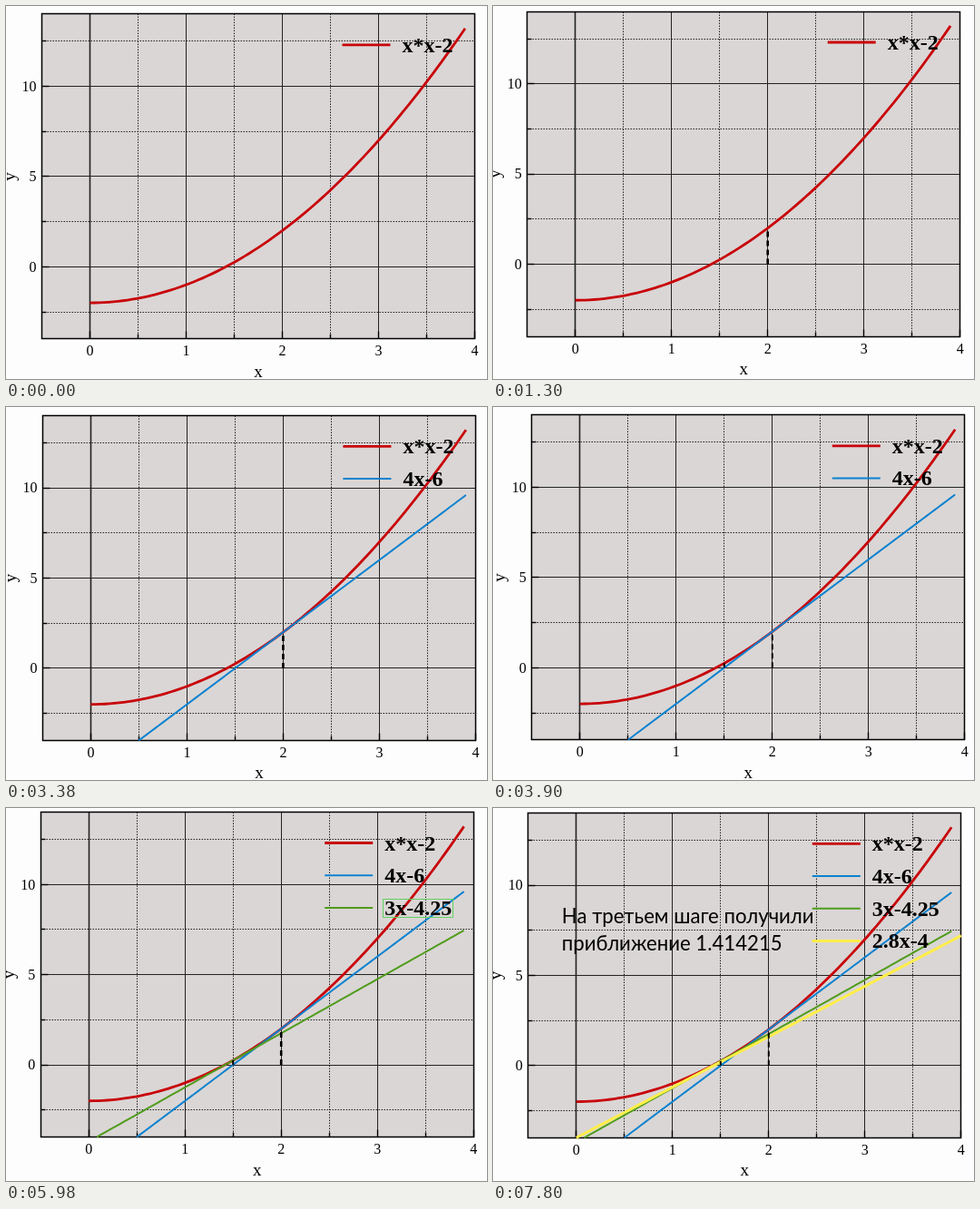
Write an HTML page with a canvas that moves like this. It is 530 px wide and 411 px high and loops after 9.1 s.

```html
<!DOCTYPE html>
<html lang="ru">
<head>
<meta charset="utf-8">
<style>
html, body { margin: 0; width: 100%; height: 100%; overflow: hidden; background: #fdfdfd; }
canvas { display: block; }
</style>
</head>
<body>
<canvas id="stage" width="530" height="411"></canvas>
<script>
const ctx = document.getElementById('stage').getContext('2d');
const STEP = 1300, UNIT_X = 106, UNIT_Y = 19.88;
const SERIF = '"Liberation Serif", "Times New Roman", serif';

const plots = [
  { label: 'x*x-2', color: '#c8040a', width: 2.8, from: 0, to: 3.9, fn: x => x * x - 2 },
  { label: '4x-6', color: '#0c82d0', width: 2, from: 0.5, to: 3.9, fn: x => 4 * x - 6 },
  { label: '3x-4.25', color: '#509c1c', width: 2, from: 0.0833, to: 3.9, fn: x => 3 * x - 4.25 },
  { label: '2.8x-4', color: '#ffee48', width: 3, from: 0, to: 4, fn: x => 2.8 * x - 4 }
];

// The chart shifts a little from step to step; legend is its left edge from x = 0.
const steps = [
  { x: 92.5, y: 287.3, lines: 1, legend: 278 },
  { x: 90.7, y: 284.5, lines: 1, legend: 278, drop: 2.6 },
  { x: 93.4, y: 287.9, lines: 2, legend: 278, drop: 2.6 },
  { x: 95.8, y: 287.3, lines: 2, legend: 278, drop: 2, second: true },
  { x: 91.2, y: 283, lines: 3, legend: 260, drop: 2.6, second: true, box: true },
  { x: 91.8, y: 283.8, lines: 4, legend: 260, drop: 2, second: true },
  { x: 91.8, y: 283.8, lines: 4, legend: 260, drop: 2, second: true, note: true }
];

const px = x => x * UNIT_X;
const py = y => -y * UNIT_Y;

function stroke(points, color, width, dash = []) {
  ctx.beginPath();
  points.forEach(([x, y]) => ctx.lineTo(x, y));
  ctx.strokeStyle = color;
  ctx.lineWidth = width;
  ctx.setLineDash(dash);
  ctx.stroke();
}

function text(value, x, y, font, align = 'left') {
  ctx.font = font;
  ctx.textAlign = align;
  ctx.fillStyle = '#000';
  ctx.fillText(value, x, y);
}

function drawGrid(origin) {
  // Grid lines sit on whole pixels.
  const snapX = x => Math.floor(origin.x + px(x)) + 0.5 - origin.x;
  const snapY = y => Math.floor(origin.y + py(y)) + 0.5 - origin.y;
  const left = snapX(-0.5), right = snapX(4), top = snapY(14), bottom = snapY(-4);
  ctx.fillStyle = '#dad6d5';
  ctx.fillRect(left, top, right - left, bottom - top);

  for (let x = 0; x <= 4; x += 0.5) {
    const major = x % 1 === 0, at = snapX(x);
    if (x < 4) stroke([[at, top], [at, bottom]], '#222', x === 0 ? 1.6 : 1, major ? [] : [1.5, 1.5]);
    stroke([[at, bottom], [at, bottom - (major ? 8 : 5)]], '#000', 1.4);
    if (major) text(x, px(x), 98, '16px ' + SERIF, 'center');
  }
  for (let y = -2.5; y <= 12.5; y += 2.5) {
    const major = y % 5 === 0, at = snapY(y);
    stroke([[left, at], [right, at]], '#222', 1, major ? [] : [1.5, 1.5]);
    stroke([[left, at], [left + (major ? 8 : 5), at]], '#000', 1.4);
    if (major) text(y, px(-0.5) - 6, py(y) + 5.3, '16px ' + SERIF, 'right');
  }
  stroke([[left, top], [right, top], [right, bottom], [left, bottom], [left, top - 0.7]], '#000', 1.5);

  text('x', px(1.75), 121.5, '19px ' + SERIF, 'center');
  ctx.save();
  ctx.translate(-82.5, py(5));
  ctx.rotate(-Math.PI / 2);
  text('y', 0, 0, '19px ' + SERIF, 'center');
  ctx.restore();
}

function drawPlot({ color, width, from, to, fn }) {
  const points = [];
  for (let i = 0; i <= 80; i++) {
    const x = from + (to - from) * i / 80;
    points.push([px(x), py(fn(x))]);
  }
  stroke(points, color, width);
}

function drawLegend({ label, color, width }, row, left) {
  const y = -244.5 + row * 35.7;
  stroke([[left, y], [left + 53, y]], color, width);
  text(label, left + 66, y + 8, 'bold 24px ' + SERIF);
}

function drawStep(step) {
  ctx.setTransform(1, 0, 0, 1, 0, 0);
  ctx.fillStyle = '#fdfdfd';
  ctx.fillRect(0, 0, 530, 411);
  ctx.translate(step.x, step.y);

  drawGrid(step);
  const shown = plots.slice(0, step.lines);
  shown.forEach(drawPlot);
  if (step.drop) stroke([[px(2), 0], [px(2), py(2)]], '#000', step.drop, [6, 4]);
  if (step.second) stroke([[px(1.5), 0], [px(1.5), py(0.25)]], '#000', 2);
  shown.forEach((plot, row) => drawLegend(plot, row, step.legend));

  if (step.box) {
    ctx.setLineDash([]);
    ctx.lineWidth = 1;
    ctx.strokeStyle = '#62d262';
    ctx.strokeRect(324.3, -182.5, 77, 20);
  }
  if (step.note) {
    const font = '22.2px Lato, "Open Sans", sans-serif';
    text('На третьем шаге получили', -16, -157, font);
    text('приближение 1.414215', -16, -127, font);
  }
}

const start = performance.now();
function tick() {
  const elapsed = Math.max(0, performance.now() - start);
  drawStep(steps[Math.floor(elapsed / STEP) % steps.length]);
  requestAnimationFrame(tick);
}
tick();
</script>
</body>
</html>
```
